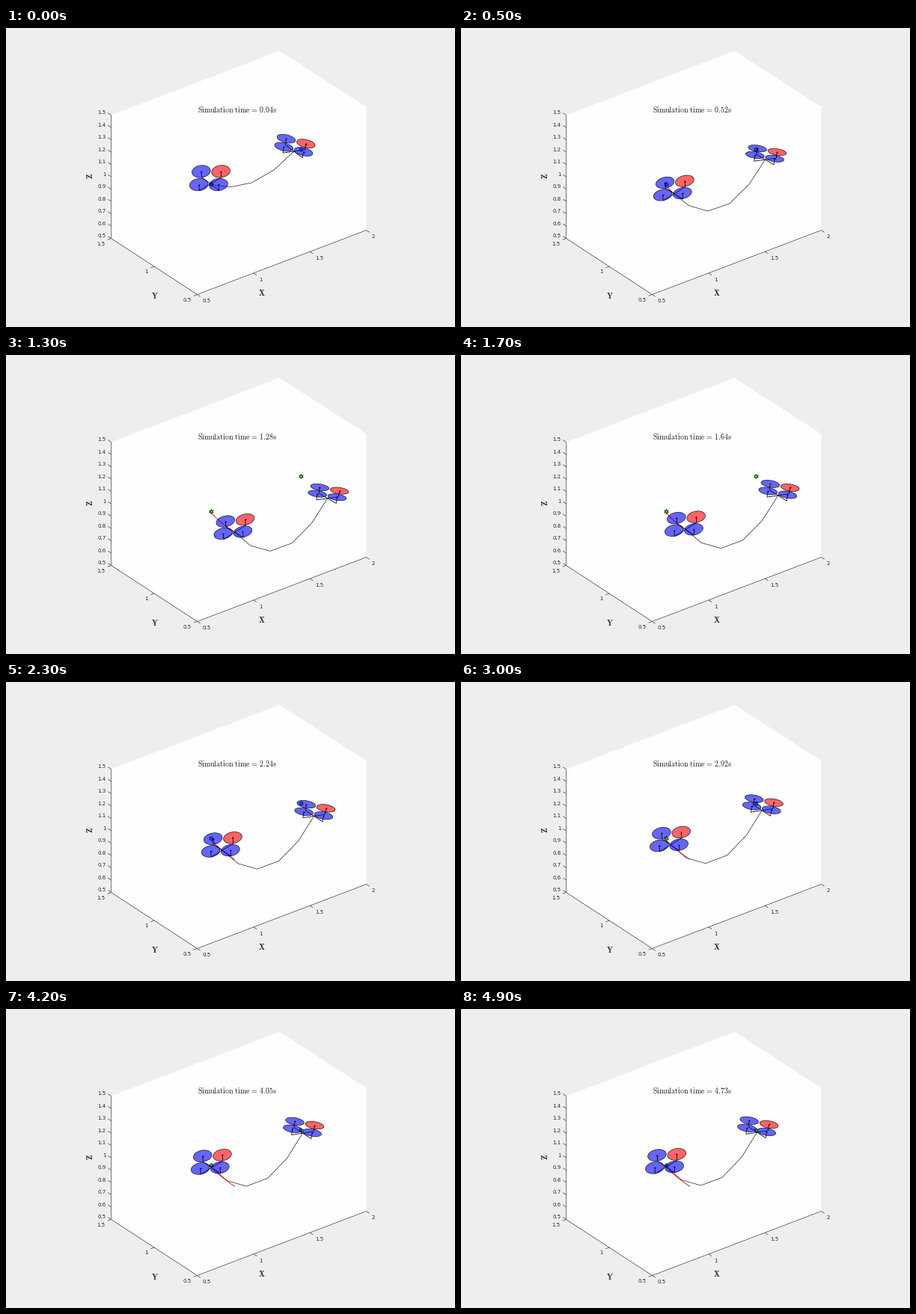
A matplotlib script for the animation above (5 s loop, 600x400 px).

```python
import numpy as np
import matplotlib.pyplot as plt
from matplotlib.animation import FuncAnimation
from matplotlib.patches import Polygon

W, H, DPI = 600, 400, 100
PX = 72 / DPI  # points per pixel
FRAMES, INTERVAL = 50, 100
INK = "#262626"
BLUE, RED = (0, 0, 1, 0.6), (1, 0, 0, 0.6)
ROTOR_RADIUS = 0.465  # relative to the arm span
THIN = 0.6
GOALS = np.array([(273, 208), (393, 161)])
SURGE_PEAK = 12

plt.rcParams["font.family"] = "DejaVu Sans"
plt.rcParams["mathtext.fontset"] = "cm"

fig = plt.figure(figsize=(W / DPI, H / DPI), dpi=DPI, facecolor="#efedf0")
ax = fig.add_axes([0, 0, 1, 1])
ax.set_xlim(-0.5, W - 0.5)
ax.set_ylim(H - 0.5, -0.5)
ax.axis("off")


def surge(step, sharpness):
    """Pull away from rest that peaks at 1 and then dies out."""
    u = max(step - 2, 0) / (SURGE_PEAK - 2)
    return (u * np.exp(1 - u)) ** sharpness


def kick(step):
    """Remainder of the starting pose."""
    return np.exp(-step / 2)


def lean(step):
    """Extra tilt while the drones brake."""
    return np.exp(-((step - 9) / 6) ** 2)


def stroke(points=((0, 0),), color="black", width=THIN, z=3):
    x, y = np.transpose(points)
    return ax.plot(x, y, color=color, lw=width * PX, zorder=z, snap=False,
                   solid_capstyle="butt")[0]


def draw_axis(start, end, values, tick, label_offset, align):
    """Axis line with evenly spaced ticks and labels."""
    start, end = np.array(start, float), np.array(end, float)
    stroke([start, end], INK)
    for s, value in zip(np.linspace(0, 1, len(values)), values):
        p = start + s * (end - start)
        stroke([p, p + tick], INK)
        x, y = p + label_offset
        ax.text(x, y, f"{value:g}", size=7 * PX, color=INK, ha=align,
                va="center_baseline")


def draw_box():
    corners = [(140, 116), (365, 30), (481, 105), (481, 270), (255, 356), (140, 281)]
    ax.add_patch(Polygon(corners, fc="#fefdff", ec="none", zorder=0))
    draw_axis((140, 281), (140, 116), np.linspace(0.5, 1.5, 11),
              (-4.2, -2.8), (-7, -3.7), "right")
    draw_axis((255, 356), (140, 281), [0.5, 1, 1.5], (-4.8, 1.8), (-8, 7), "right")
    draw_axis((255, 356), (481, 270), [0.5, 1, 1.5, 2], (4.2, 2.8), (7, 8.3), "left")
    for x, y, name, turn in [(341, 354, "X", 0), (198, 357, "Y", 0), (112, 198, "Z", 90)]:
        ax.text(x, y, rf"$\mathbf{{{name}}}$", size=10.5 * PX, rotation=turn,
                color=INK, ha="center", va="center")


class Drone:
    def __init__(self, rest, pull, start_shift, span, start_tilt, lean_tilt, mast):
        self.rest, self.pull = np.array(rest), np.array(pull)
        self.start_shift, self.span = np.array(start_shift), np.array(span)
        # vertical change of the two span vectors
        self.start_tilt, self.lean_tilt = np.array(start_tilt), np.array(lean_tilt)
        self.mast = np.array(mast)
        self.arms = [stroke(width=0.8, z=4) for _ in range(2)]
        self.masts = [stroke(width=0.8, z=6) for _ in range(4)]
        self.hubs = ax.plot([], [], "o", color="black", ms=1.8 * PX, mew=0, zorder=6)[0]
        self.rotors = [ax.add_patch(Polygon([(0, 0)], fc=color, ec="black",
                                            lw=THIN * PX, zorder=5))
                       for color in (BLUE, RED, BLUE, BLUE)]

    def center(self, step):
        away = np.array([surge(step, 2.1), surge(step, 1.7)])
        return self.rest + self.pull * away + self.start_shift * kick(step)

    def pose(self, step):
        span = self.span.copy()
        span[:, 1] += self.start_tilt * kick(step) + self.lean_tilt * lean(step)
        signs = np.array([(-1, -1), (1, -1), (-1, 1), (1, 1)]) / 2
        feet = self.center(step) + signs @ span
        hubs = feet - self.mast
        a = np.linspace(0, 2 * np.pi, 48)
        disc = ROTOR_RADIUS * np.column_stack([np.cos(a), np.sin(a)]) @ span
        for rotor, mast, hub, foot in zip(self.rotors, self.masts, hubs, feet):
            rotor.set_xy(hub + disc)
            mast.set_data(*np.transpose([hub, foot]))
        self.arms[0].set_data(*feet[[0, 3]].T)
        self.arms[1].set_data(*feet[[1, 2]].T)
        self.hubs.set_data(*hubs.T)


def hang_cable(start, end, step):
    """Five links between the drones, sagging as a parabola below the chord."""
    t = np.linspace(0, 1, 6)
    along = t - 0.031 * np.sin(2 * np.pi * t)
    along = np.abs(along) ** (1 + 0.45 * kick(step))
    points = start + along[:, None] * (end - start)
    points[:, 1] += (45 - 25 * kick(step)) * 4 * along * (1 - along)
    return points


draw_box()
ax.plot(*GOALS.T, ls="", marker=(6, 1, 0), ms=6.5 * PX, mfc="#00ff00",
        mec="black", mew=0.6 * PX, zorder=2)
cable = stroke()
trace = stroke(color="#f01010", width=0.9, z=3.5)
clock = ax.text(255, 112.3, "", size=9.9 * PX, color="#1a1a1a", va="baseline")
left = Drone(rest=(273.4, 210), pull=(32, 27), start_shift=(-0.8, -2),
             span=[(26.3, -1.3), (-3.1, 16.8)], start_tilt=(1.4, 0.9),
             lean_tilt=(-1.7, -0.8), mast=(0.7, 7.8))
right = Drone(rest=(394.7, 163.8), pull=(34.8, 27.7), start_shift=(-10.4, 0.7),
              span=[(26.3, 5.2), (-3.2, 9.9)], start_tilt=(1.4, 1.2),
              lean_tilt=(-0.9, -1.9), mast=(-1.2, 8.2))


def update(step):
    left.pose(step)
    right.pose(step)
    cable.set_data(*hang_cable(left.center(step), right.center(step), step).T)
    trail = [GOALS[0]] + [left.center(s) for s in range(2, min(step, SURGE_PEAK) + 1)]
    trace.set_data(*np.transpose(trail))
    seconds = 0.04006 * ((5 + 12 * step) // 5)
    clock.set_text(rf"$\mathrm{{Simulation\ time\,=\,{seconds:.2f}s}}$")


anim = FuncAnimation(fig, update, frames=FRAMES, interval=INTERVAL,
                     init_func=lambda: update(0), repeat=True, repeat_delay=0)
plt.show()
```
